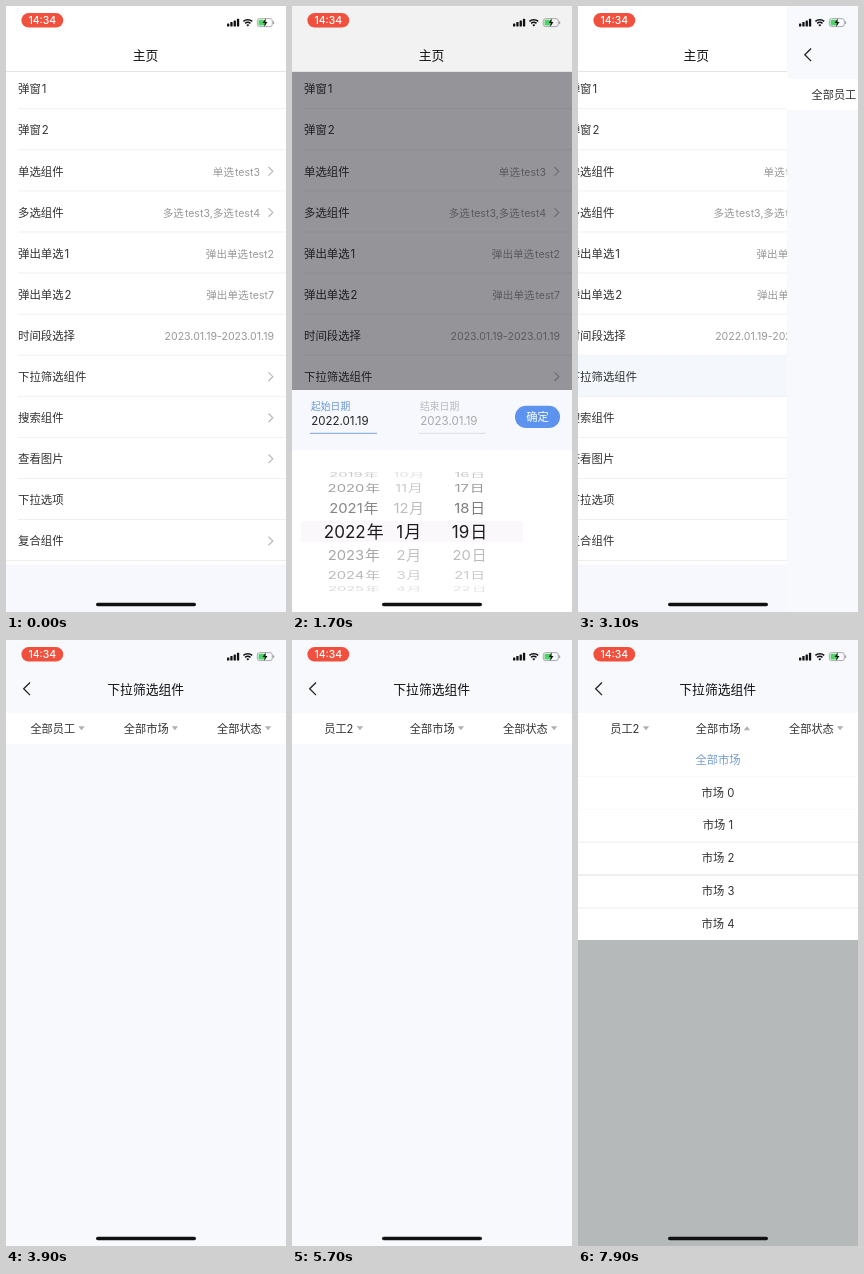
These frames come from a looping animation (280 by 606 pixels, 8 s). An HTML page:

```html
<!DOCTYPE html>
<html lang="zh-CN">
<head>
<meta charset="utf-8">
<style>
  html, body { margin: 0; width: 100%; height: 100%; overflow: hidden; background: #fff; }
  svg { display: block; width: 100vw; height: 100vh; }
  text { font-family: Inter, "Noto Sans CJK SC", "Noto Sans CJK", sans-serif; white-space: pre; }
</style>
</head>
<body>
<svg id="stage" viewBox="0 0 280 606" xmlns="http://www.w3.org/2000/svg"></svg>
<script>
const LOOP = 8000;
const stage = document.getElementById('stage');
const $ = id => document.getElementById(id);

// ---------- drawing helpers ----------
// Adds the small gap between Han characters and Latin letters or digits.
const spaced = (s, gap) => s
  .split(/(?<=[一-龥])(?=[a-z0-9])|(?<=[a-z0-9])(?=[一-龥])/i)
  .map((run, i) => `<tspan${i ? ` dx="${gap}"` : ''}>${run}</tspan>`).join('');

const text = (x, cy, s, size, { anchor = 'start', fill = '#333', weight = 400, gap = 1, id = '' } = {}) =>
  `<text ${id && `id="${id}"`} x="${x}" y="${(cy + size * 0.37).toFixed(2)}" font-size="${size}" ` +
  `text-anchor="${anchor}" fill="${fill}" font-weight="${weight}">${spaced(s, gap)}</text>`;

const rect = (x, y, w, h, fill, extra = '') =>
  `<rect x="${x}" y="${y}" width="${w}" height="${h}" fill="${fill}" ${extra}/>`;

const stroke = (d, color, width, extra = '') =>
  `<path d="${d}" fill="none" stroke="${color}" stroke-width="${width}" ${extra}/>`;

const group = (id, body, extra = '') => `<g id="${id}" ${extra}>${body}</g>`;

// ---------- main page ----------
const ROW = 41.07, ROW_TOP = 62.3, RANGE_ROW = 6, FILTER_ROW = 7;
const rows = [
  ['弹窗1'], ['弹窗2'],
  ['单选组件', '单选test3', true],
  ['多选组件', '多选test3,多选test4', true],
  ['弹出单选1', '弹出单选test2'],
  ['弹出单选2', '弹出单选test7'],
  ['时间段选择', '2023.01.19-2023.01.19'],
  ['下拉筛选组件', '', true], ['搜索组件', '', true], ['查看图片', '', true],
  ['下拉选项'], ['复合组件', '', true]
];

function rowMarkup([label, value, arrow], i) {
  const top = ROW_TOP + ROW * i, cy = top + 20.9;
  return rect(0, top, 280, ROW, '#f4f8fd', `id="press${i}" opacity="0"`) +
    group('row' + i,
      text(12, cy, label, 11.4) +
      (value ? text(arrow ? 254 : 268, cy + 0.3, value, 10.55, { anchor: 'end', fill: '#999', id: 'value' + i }) : '') +
      (arrow ? stroke(`M262.5 ${cy - 4.3}l4.3 4.3l-4.3 4.3`, '#b8b8b8', 1.2) : '')) +
    rect(i === rows.length - 1 ? 0 : 12, top + ROW - 1, 280, 0.8, '#ececec');
}

const mainPage =
  rect(0, 0, 280, 606, '#f7f8fd') + rect(0, 0, 280, 558.5, '#fff') +
  rows.map(rowMarkup).join('') +
  rect(0, 66, 280, 540, '#04000a', 'id="dim" opacity="0"') +
  rect(0, 0, 280, 65.5, '#fff') +
  rect(0, 0, 280, 65.5, '#000', 'id="headDim" opacity="0"') +
  rect(0, 65, 280, 0.8, '#dedede') +
  text(139.5, 49, '主页', 12.8, { anchor: 'middle', fill: '#111', weight: 500 });

// ---------- date sheet ----------
const SHEET_TOP = 384, SHEET_HEIGHT = 222, REACH = 4;
const columns = [
  { x: 61.8, label: k => `${2023 + k}年`, above: 0.58, below: 0.42 },
  { x: 116.8, label: k => `${(k + 12) % 12 + 1}月`, above: 0.32, below: 0.3 },
  { x: 177.6, label: k => `${19 + k}日`, above: 0.62, below: 0.32 }
];
const wheelItems = [];
columns.forEach((col, c) => {
  for (let k = -REACH - 1; k <= REACH; k++) wheelItems.push({ col, c, k, id: `wheel${c}_${k}` });
});

const dateField = (x, label, date, colors, id) =>
  text(x, 16.2, label, 9.8, { fill: colors[0] }) +
  text(x + 0.3, 31.2, date, 11.5, { fill: colors[1], id }) +
  rect(x - 1, 42.8, 67, 1, colors[2]);

const sheet =
  rect(0, 0, 280, 222, '#fff') + rect(0, 0, 280, 60, '#f6f8fd') +
  dateField(19, '起始日期', '2023.01.19', ['#6c96d3', '#222', '#78a3e3']) .replace('<text  x="19.3"', '<text id="startDate" x="19.3"') +
  dateField(128, '结束日期', '2023.01.19', ['#b9b9bc', '#a9a9ab', '#dcdde2']) +
  rect(223, 15.7, 45, 22.4, '#5c93ee', 'rx="11.2"') +
  text(245.5, 26.8, '确定', 11.3, { anchor: 'middle', fill: '#fff', id: 'confirm' }) +
  rect(9, 131, 222, 21, '#faf8fb') +
  wheelItems.map(({ col, k, id }) =>
    group(id, text(0, 0, col.label(k), 14.8, { anchor: 'middle', fill: '#1c1c1e', gap: 0.9 }))).join('');

// ---------- filter page ----------
const tabs = [
  { name: '员工', x: 46.8, space: '' },
  { name: '市场', x: 140.2, space: ' ' },
  { name: '状态', x: 233.4, space: ' ' }
];
const MENU_ROW = 32.9;

const menuMarkup = ({ name, space }, i) => group('menu' + i,
  rect(0, 104, 280, 196, '#fff') +
  [1, 2, 3, 4, 5].map(n => rect(0, 103 + MENU_ROW * n, 280, 0.9,
    n === 4 ? '#dcdcdc' : n < 3 ? '#f8f8f8' : '#ebebeb')).join('') +
  [`全部${name}`, ...[0, 1, 2, 3, 4].map(n => name + space + n)].map((s, n) =>
    text(140, 119.5 + MENU_ROW * n, s, 11.3, {
      anchor: 'middle', fill: n ? '#333' : '#759dd0', gap: 0
    })).join(''), 'opacity="0"');

const filterPage =
  rect(0, 0, 280, 606, '#f7f9fd') + rect(0, 73, 280, 31, '#fff') +
  stroke('M24 42.5L17.7 48.8L24 55.1', '#222', 1.3) +
  text(139.7, 49.2, '下拉筛选组件', 12.8, { anchor: 'middle', fill: '#111', weight: 500 }) +
  rect(0, 104, 280, 502, '#b5b9ba', 'id="backdrop" opacity="0"') +
  tabs.map(menuMarkup).join('') +
  tabs.map(({ name, x }, i) =>
    text(x, 89.3, `全部${name}`, 11.2, { anchor: 'middle', id: 'tab' + i, gap: 0 }) +
    `<path id="tri${i}" d="M-3.2 -2H3.2L0 2Z" fill="#b0b0b0"/>`).join('');

// ---------- system bar ----------
const systemBar =
  rect(15.4, 7.1, 41.8, 14.5, '#f2503f', 'rx="7.2"') +
  text(36.2, 14.4, '14:34', 10.4, { anchor: 'middle', fill: '#fff', weight: 500 }) +
  [0, 1, 2, 3].map(i => rect(221 + i * 3.3, 17.6 - i * 1.6, 2.3, 3 + i * 1.6, '#111', 'rx=".6"')).join('') +
  stroke('M237.4 15.4a6.6 6.6 0 0 1 8.8 0M239.1 17.4a4.1 4.1 0 0 1 5.4 0', '#111', 1.5) +
  '<path d="M240.3 18.9a2.3 2.3 0 0 1 3 0l-1.5 1.7z" fill="#111"/>' +
  rect(251.3, 12.6, 15, 8, 'none', 'rx="2.3" stroke="#999" stroke-width=".8"') +
  rect(252.5, 13.8, 7.5, 5.6, '#4fd267', 'rx="1.2"') +
  '<path d="M260 12.2l-3.4 4.9h2.3l-1 4l3.6-5.1h-2.4z" fill="#111"/>' +
  rect(267.1, 15.2, 1.1, 2.8, '#999', 'rx=".5"');

stage.innerHTML =
  group('main', mainPage) + group('sheet', sheet) + group('filter', filterPage) +
  systemBar + rect(90, 596.8, 100, 3.5, '#111', 'rx="1.75"');

// ---------- motion ----------
const set = (id, name, value) => $(id).setAttribute(name, value);
const put = (id, value) => { if ($(id).textContent !== value) $(id).textContent = value; };
const ramp = (t, from, to) => Math.min(1, Math.max(0, (t - from) / (to - from)));
const smooth = u => u * u * (3 - 2 * u);
const easeOut = u => 1 - (1 - u) ** 3;
const pulse = (t, a, b, c, d) => ramp(t, a, b) * (1 - ramp(t, c, d));
const within = (t, a, b) => t >= a && t < b;

function drawWheel(yearPos) {
  const step = 0.39, radius = 62;
  for (const { col, c, k, id } of wheelItems) {
    const offset = k - (c ? 0 : yearPos), angle = offset * step;
    if (Math.abs(angle) > 1.45) { set(id, 'opacity', 0); continue; }
    const near = Math.max(0, 1 - Math.abs(offset)), tilt = Math.cos(angle);
    const scale = 1 + 0.15 * near;
    const tone = (offset < 0 ? col.above : col.below) * tilt;
    set(id, 'transform', `translate(${col.x} ${141.5 + radius * Math.sin(angle)}) scale(${scale} ${scale * tilt})`);
    set(id, 'opacity', tone + (1 - tone) * near);
  }
}

function drawMain(t) {
  const shown = smooth(ramp(t, 300, 680)) * (1 - smooth(ramp(t, 2200, 2516)));
  set('sheet', 'transform', `translate(0 ${SHEET_TOP + SHEET_HEIGHT * (1 - shown)})`);
  set('sheet', 'display', shown > 0 ? 'inline' : 'none');
  set('dim', 'opacity', 0.42 * shown);
  set('headDim', 'opacity', 0.05 * Math.max(0, shown * 2 - 1));

  const rangePress = Math.max(pulse(t, 100, 200, 300, 500), pulse(t, 2200, 2300, 2450, 2700));
  set('press' + RANGE_ROW, 'opacity', rangePress);
  set('row' + RANGE_ROW, 'opacity', 1 - 0.3 * rangePress);
  set('press' + FILTER_ROW, 'opacity', pulse(t, 2850, 2950, 3100, 3400));

  put('startDate', t < 1500 ? '2023.01.19' : '2022.01.19');
  put('value' + RANGE_ROW, `${t < 2200 ? 2023 : 2022}.01.19-2023.01.19`);
  set('confirm', 'opacity', 1 - 0.35 * pulse(t, 2100, 2200, 2450, 2550));
  drawWheel(-smooth(ramp(t, 1000, 1450)));

  const push = easeOut(ramp(t, 3050, 3600));
  set('main', 'transform', `translate(${-84 * push} 0)`);
  set('filter', 'transform', `translate(${280 * (1 - push)} 0)`);
}

function drawFilter(t) {
  const open = [
    pulse(t, 4650, 4800, 5200, 5350),
    ramp(t, 7550, 7600),
    ramp(t, 6400, 6550) * (t < 7550 ? 1 : 0)
  ];
  const presses = [[4450, 4600], [7400, 7550], [6250, 6400]];
  set('backdrop', 'opacity', Math.max(open[0], ramp(t, 6400, 6550)));
  const chosen = t >= 5200;
  put('tab0', chosen ? '员工2' : '全部员工');
  tabs.forEach(({ x }, i) => {
    const side = i === 0 && chosen ? 21.2 : 28.7;
    set('menu' + i, 'opacity', open[i]);
    set('tab' + i, 'opacity', within(t, ...presses[i]) ? 0.5 : 1);
    set('tri' + i, 'transform', `translate(${x + side} 88.3) scale(1 ${open[i] > 0 ? -1 : 1})`);
  });
}

function frame(now) {
  const t = now % LOOP;
  drawMain(t);
  drawFilter(t);
}

const begin = performance.now();
(function tick() {
  frame(performance.now() - begin);
  requestAnimationFrame(tick);
})();
</script>
</body>
</html>
```
